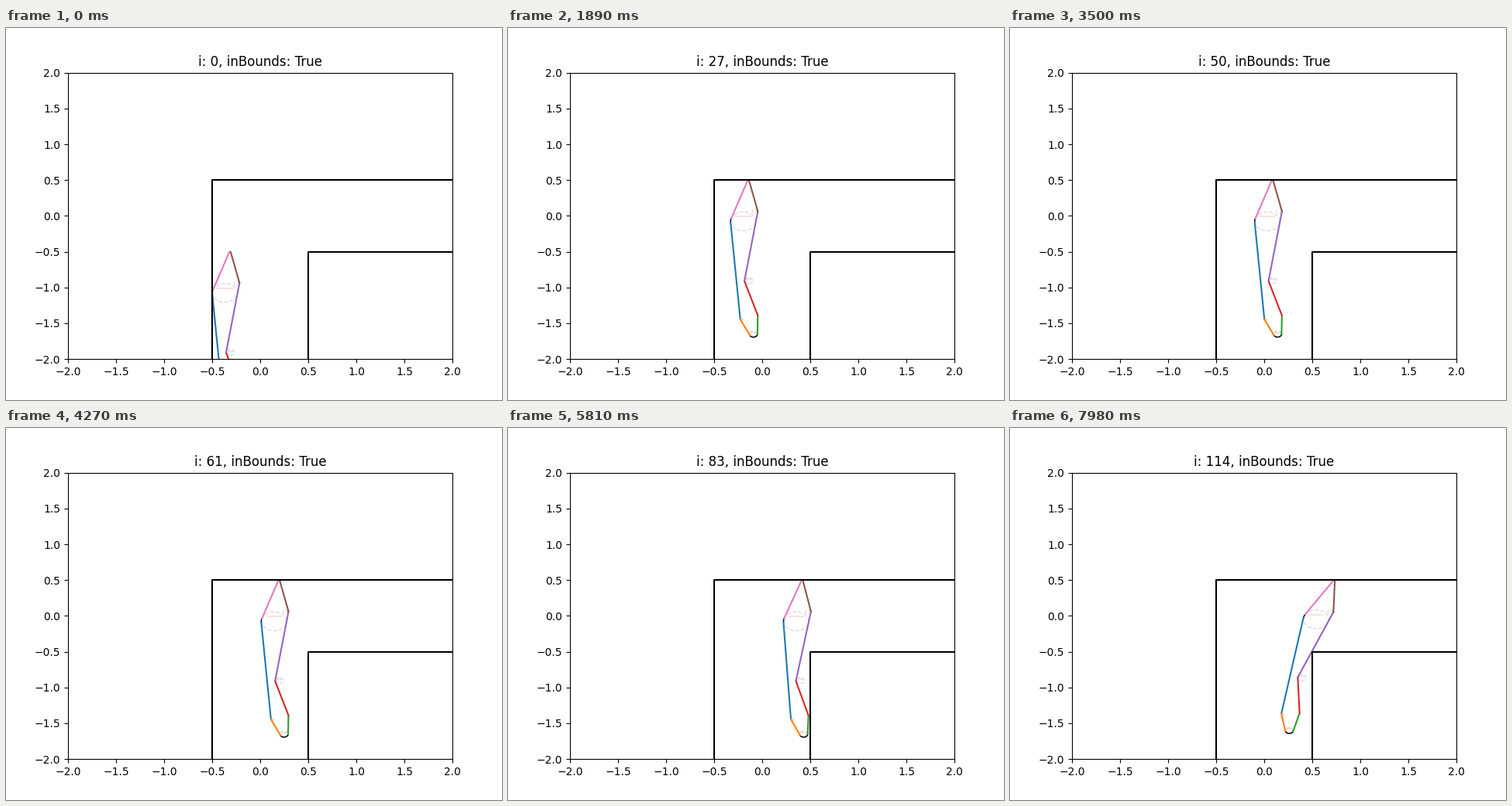
A matplotlib script that plays this animation: 640x480 px, repeating every 8000 ms.

```python
import numpy as np
import matplotlib.pyplot as plt
from matplotlib.animation import FuncAnimation

LOOP, TICK, STEP = 8000, 20, 70
LIFT_STEPS, LIFT, SLIDE = 10, 0.1, 0.01
TURN, TURN_SHIFT = np.radians(1), 0.0103

UNIT = np.array([124.0, -92.4])  # pixels per data unit


def local(*pts):
    """Body points given in pixels from the tip."""
    return np.array(pts, float) / UNIT


def arc(center, r, a0, a1, n=40):
    a = np.radians(np.linspace(a0, a1, n))
    return center + r * np.column_stack([np.cos(a), np.sin(a)])


HIP, KNEE, HEEL, TOE = local((-6.6, 53.3), (0.3, 130), (6.6, 198.8), (-8.6, 180.2))
ELBOW = local((8.5, 40.5))[0]
CORNER = local((12.2, 174.9))[0]
SIDE = local((12.2, 41), (-4.9, 129.5))

EDGES = [
    ("C0", local((-22.9, 54.2), (-10.4, 179.2))),
    ("C1", local((-10.3, 179.8), (2.0, 200.4))),
    ("C2", local((11.8, 198.8), (12.2, 175.4))),
    ("C3", local((-4.8, 130.8), (12.2, 174.6))),
    ("C4", SIDE),
    ("C5", local((0.8, 0.2), (12.2, 40))),
    ("C6", local((-0.7, 0.2), (-22, 49.6))),
]
ARCS = [
    arc(HIP, 0.131, 162, 184),
    arc(HEEL, 0.0417, 204, 360),
    local((-4.9, 129.5), (-4.8, 130.8)),
    local((12.2, 40), (12.2, 41)),
]
CIRCLES = [(HIP, 0.131), (KNEE, 0.042), (HEEL, 0.0417), (ELBOW, 0.028), (TOE, 0.015)]


def place(pts, tip, angle):
    c, s = np.cos(angle), np.sin(angle)
    return np.asarray(pts) @ np.array([[c, -s], [s, c]]) + tip


def fits(tip, angle):
    """True while the body clears the inner wall and its corner."""
    if place(CORNER, tip, angle)[0] > 0.5:
        return False
    (x0, y0), (x1, y1) = place(SIDE, tip, angle)
    return x0 + (x1 - x0) * (-0.5 - y0) / (y1 - y0) <= 0.5


def plan(count):
    """Lift to the top wall, then slide right, turning whenever blocked."""
    tip, angle = np.array([-0.3145, -0.5]), 0.0
    poses = [(tip, angle)]
    for i in range(1, count):
        if i <= LIFT_STEPS:
            tip = tip + [0, LIFT]
        elif fits(tip + [SLIDE, 0], angle):
            tip = tip + [SLIDE, 0]
        else:
            tip, angle = tip + [TURN_SHIFT, 0], angle + TURN
        poses.append((tip, angle))
    return poses


poses = plan(-(-LOOP // STEP))

fig, ax = plt.subplots(figsize=(6.4, 4.8), dpi=100)
ax.set(xlim=(-2, 2), ylim=(-2, 2))
title = ax.set_title("")

ax.plot([-0.5, -0.5, 2], [-2, 0.5, 0.5], "k", lw=1.5, zorder=3)
ax.plot([0.5, 0.5, 2], [-2, -0.5, -0.5], "k", lw=1.5, zorder=3)

parts = []


def add(pts, **style):
    line, = ax.plot([], [], **style)
    parts.append((line, pts))


for center, r in CIRCLES:
    add(arc(center, r, 0, 360, 80), color="gray", alpha=0.28, lw=1, ls="--")
for pts in ARCS:
    add(pts, color="k", lw=1.1)
for color, pts in EDGES:
    add(pts, color=color, lw=1.5)

# Faint level marks inside the larger circles
marks = [(ax.plot([], [], color="red", alpha=0.12, lw=1.5, solid_capstyle="butt")[0],
          center, r) for center, r in CIRCLES if r > 0.04]


def draw(k):
    i = min((k * TICK + TICK // 2) // STEP, len(poses) - 1)
    tip, angle = poses[i]
    for line, pts in parts:
        line.set_data(*place(pts, tip, angle).T)
    for line, center, r in marks:
        x, y = place(center, tip, angle)
        line.set_data([x - 0.62 * r, x + 0.62 * r], [y + 0.5 * r] * 2)
    title.set_text(f"i: {i}, inBounds: True")
    return []


anim = FuncAnimation(fig, draw, frames=LOOP // TICK, interval=TICK,
                     repeat=True, repeat_delay=0)
plt.show()
```
